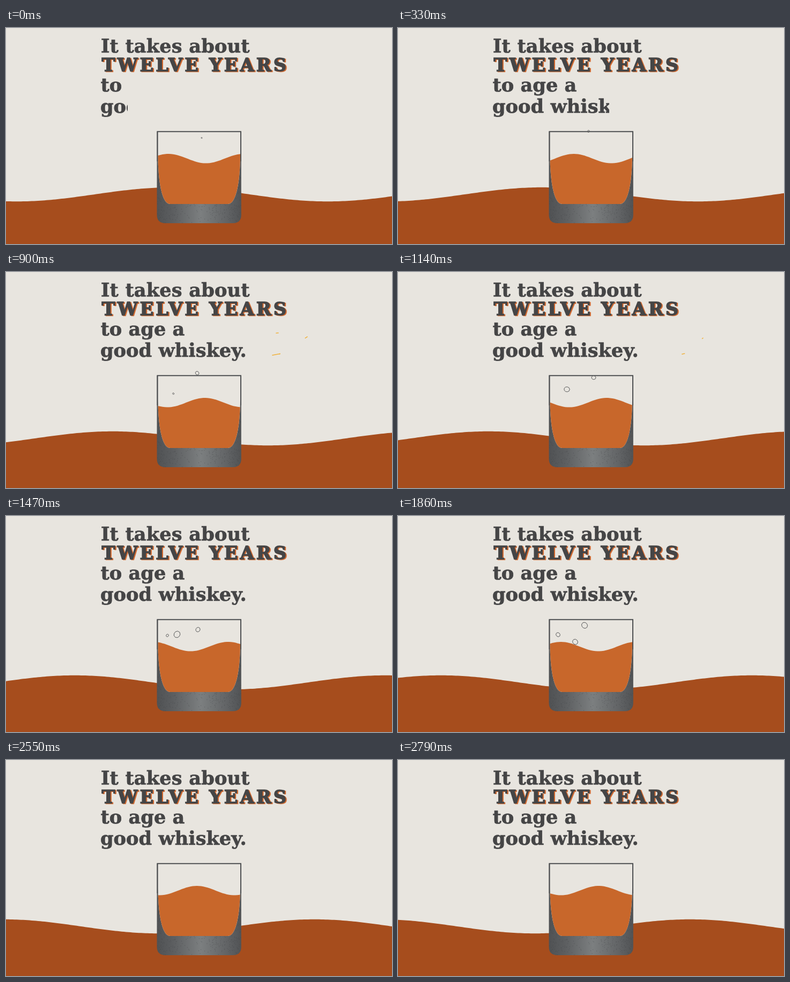
An HTML page that plays this animation: 720x405 px, repeating every 2.82 s.

```html
<!DOCTYPE html>
<html lang="en">
<head>
<meta charset="utf-8">
<title>Twelve years</title>
<style>
  html, body { margin: 0; width: 100%; height: 100%; overflow: hidden; background: #e8e5df; }
  svg { display: block; width: 100%; height: 100%; }
  text { font: bold 35.2px "DejaVu Serif", "Noto Serif", serif; fill: #454546; stroke: #454546; stroke-width: .7; }
  .loud { font-size: 33.5px; letter-spacing: 4.2px; stroke-width: 1.5; }
  .shade { fill: #d2692f; stroke: #d2692f; }
  #bubbles { fill: none; stroke: #58595a; stroke-width: 1; stroke-linejoin: round; }
  #sparks { fill: none; stroke: #f0b23c; stroke-width: 1.5; stroke-linecap: round; }
</style>
</head>
<body>
<svg viewBox="0 0 720 405">
  <defs>
    <linearGradient id="glassTone">
      <stop offset="0" stop-color="#505254"/>
      <stop offset=".2" stop-color="#5d5f61"/>
      <stop offset=".52" stop-color="#7c7f80"/>
      <stop offset=".85" stop-color="#606264"/>
      <stop offset="1" stop-color="#515355"/>
    </linearGradient>
    <clipPath id="cavityClip"><use href="#cavity"/></clipPath>
    <clipPath id="glassClip"><use href="#glass"/></clipPath>
    <clipPath id="wipe"><rect id="wipeBox" x="170" y="86" height="90"/></clipPath>
  </defs>

  <rect width="720" height="405" fill="#e8e5df"/>
  <path id="sea" fill="#a64d1d"/>

  <path id="glass" fill="url(#glassTone)" d="M281.5 193.5H438.8V350Q438.8 366 422.8 366H297.5Q281.5 366 281.5 350Z"/>
  <path id="stipple" clip-path="url(#glassClip)" stroke="#434547" stroke-width="1" opacity=".55"/>
  <path id="cavity" fill="#e8e5df" d="M283.4 195H437V240C436.5 290 429 330 414 330H306C291 330 284 290 283.4 240Z"/>
  <path id="liquid" fill="#c8672b" clip-path="url(#cavityClip)"/>
  <path fill="none" stroke="#4b4d4f" stroke-width="1.8" d="M282.4 250V194.3H438V250"/>
  <g id="bubbles"></g>

  <text x="177" y="46" letter-spacing=".15">It takes about</text>
  <text class="loud shade" x="180.5" y="81.5">TWELVE YEARS</text>
  <text class="loud" x="178.5" y="81">TWELVE YEARS</text>
  <g clip-path="url(#wipe)">
    <text x="176.5" y="119">to age a</text>
    <text x="176" y="159">good whiskey.</text>
  </g>
  <path id="sparks"/>
</svg>
<script>
const LOOP = 2820, STEP = 30;
const $ = id => document.getElementById(id);
const set = (el, attrs) => { for (const k in attrs) el.setAttribute(k, attrs[k]); };
const clamp = v => Math.min(1, Math.max(0, v));
const mix = (a, b, u) => a + (b - a) * u;

// Keys: time, x, y, radius
const bubbles = [
  [[-200, 370, 216, 0], [0, 365, 206, 1], [660, 349.5, 186, 3], [1140, 365, 198, 3.8],
   [1470, 358, 213, 4.2], [1860, 348, 205, 5.6], [2080, 343, 199, 0]],
  [[800, 311, 232, 0], [1140, 315, 220, 5], [1470, 319, 222, 6], [1860, 330.5, 236, 5], [2080, 336, 244, 0]],
  [[1300, 304, 229, 0], [1470, 301, 224, 2.4], [1860, 298.5, 222.5, 3.9], [2310, 322, 207, 3.9], [2560, 331, 198, 0]]
].map(keys => {
  const el = document.createElementNS("http://www.w3.org/2000/svg", "path");
  $("bubbles").append(el);
  return { keys, el };
});

// Positions refer to 660 ms; velocity in px/ms
const sparks = [
  { tail: [464, 117], head: [484, 115.5], v: [.1, -.005], end: 960 },
  { tail: [464, 158], head: [488, 153.5], v: [.097, -.001], end: 1260 },
  { tail: [476, 152], head: [489, 154], v: [.09, 0], end: 900 },
  { tail: [513, 147], head: [518, 145], v: [.05, -.02], end: 840 },
  { tail: [549, 123], head: [555, 119], v: [.029, .01], end: 1300 }
];

function wave(left, right, bottom, crest, length, mean, height) {
  let d = `M${left} ${bottom}`;
  for (let x = left; x <= right; x += 4) {
    const y = mean - height * Math.cos((x - crest) / length * 2 * Math.PI);
    d += `L${x} ${y.toFixed(2)}`;
  }
  return d + `V${bottom}Z`;
}

function spline(keys, i, u, c) {
  const p = n => keys[Math.min(keys.length - 1, Math.max(0, n))];
  const slope = n => (p(n + 1)[c] - p(n - 1)[c]) / (p(n + 1)[0] - p(n - 1)[0]);
  const span = keys[i + 1][0] - keys[i][0], w = 1 - u;
  return w * w * (1 + 2 * u) * keys[i][c] + u * u * (3 - 2 * u) * keys[i + 1][c]
    + span * u * w * (w * slope(i) - u * slope(i + 1));
}

function bubblePath(keys, t) {
  const i = keys.findIndex((k, n) => n < keys.length - 1 && t >= k[0] && t < keys[n + 1][0]);
  if (i < 0) return "";
  const u = (t - keys[i][0]) / (keys[i + 1][0] - keys[i][0]);
  const x = spline(keys, i, u, 1), y = spline(keys, i, u, 2);
  const r = mix(keys[i][3], keys[i + 1][3], u);
  if (r < .3) return "";
  const points = Array.from({ length: 9 }, (_, n) => {
    const a = n / 9 * 2 * Math.PI;
    const q = r * (1 + .07 * Math.sin(2 * a + t / 150));
    return `${(x + q * Math.cos(a)).toFixed(2)} ${(y + q * Math.sin(a)).toFixed(2)}`;
  });
  return `M${points.join("L")}Z`;
}

function sparkPath({ tail, head, v, end }, t) {
  const start = 450;
  if (t < start || t > end) return "";
  const dt = t - 660;
  const size = t < 660 ? clamp((t - start) / 150) : clamp((end - t) / (end - 660));
  const h = head.map((p, i) => p + v[i] * dt);
  const b = h.map((p, i) => p + (tail[i] - head[i]) * size);
  return `M${b[0]} ${b[1]}L${h[0]} ${h[1]}`;
}

function drawStipple() {
  let seed = 7, d = "";
  const random = () => (seed = seed * 16807 % 2147483647) / 2147483647;
  for (let i = 0; i < 1100; i++) {
    const x = 282 + 156 * random(), y = 260 + 106 * random();
    if (random() < .15 + Math.abs(x - 363) / 100) d += `M${x.toFixed(1)} ${y.toFixed(1)}h1`;
  }
  set($("stipple"), { d });
}

function draw(t) {
  set($("sea"), { d: wave(0, 720, 405, 310 - .1235 * t, 580, 312, 13.2) });
  set($("liquid"), { d: wave(280, 440, 340, 303 + .0757 * t, 140, 244.8, 8.8) });
  set($("wipeBox"), { width: mix(57, 300, clamp(t / 480)) });
  for (const { keys, el } of bubbles) set(el, { d: bubblePath(keys, t) });
  set($("sparks"), { d: sparks.map(s => sparkPath(s, t)).join("") });
}

function tick() {
  draw(Math.floor(performance.now() % LOOP / STEP) * STEP);
  requestAnimationFrame(tick);
}

drawStipple();
draw(0);
requestAnimationFrame(tick);
</script>
</body>
</html>
```
